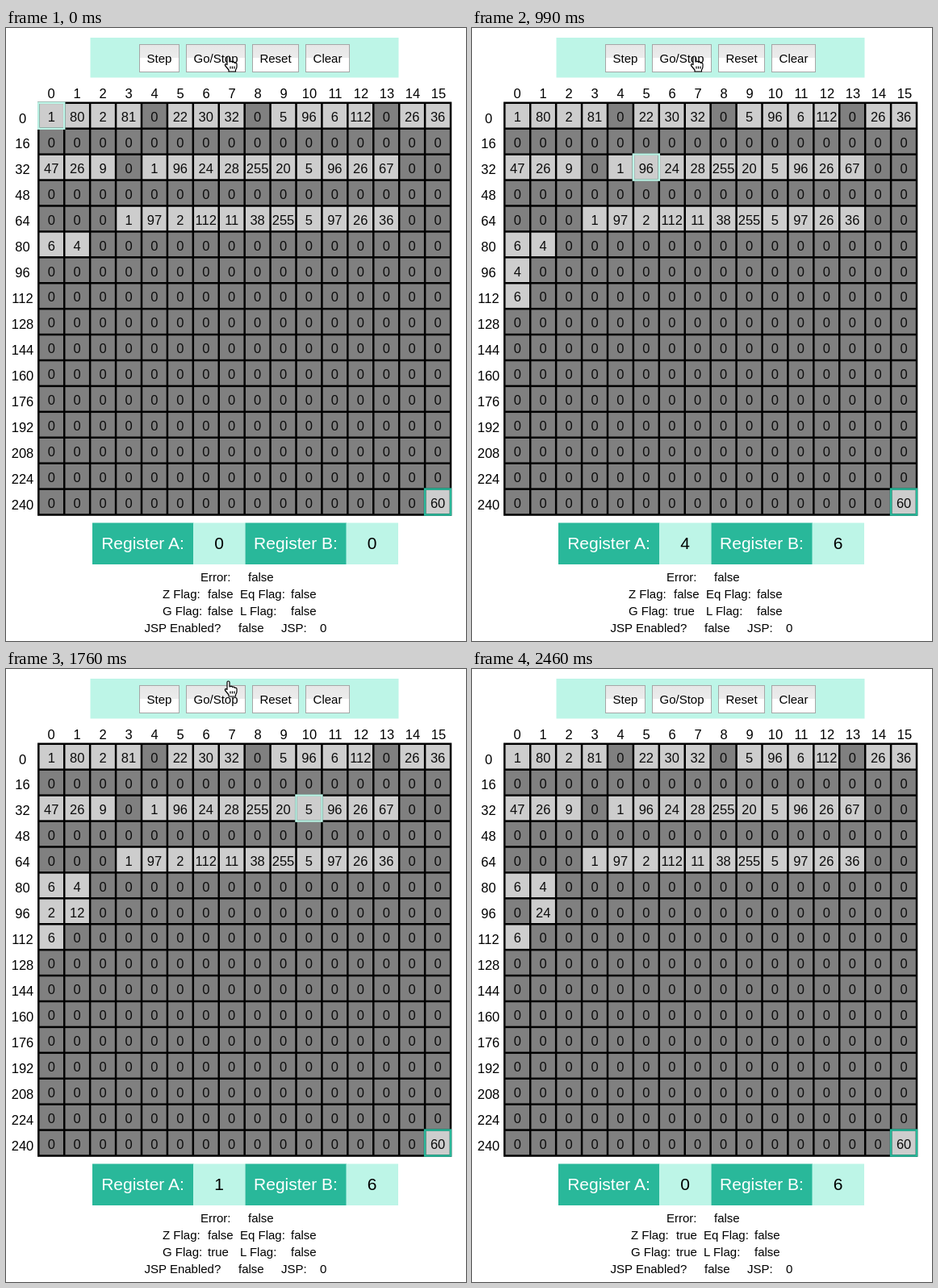
An HTML page that plays this animation: 570 by 760 pixels, repeating every 3.21 s.

```html
<!DOCTYPE html>
<html lang="en">
<head>
<meta charset="utf-8">
<title>Eight-bit computer</title>
<style>
html, body { margin: 0; width: 100%; height: 100%; overflow: hidden; background: #fff; }
svg { display: block; font-family: "Liberation Sans", Arial, sans-serif; }
text { white-space: pre; }
.num { font-size: 16.5px; text-anchor: middle; }
.btn { font-size: 15px; text-anchor: middle; }
.reg { font-size: 21px; text-anchor: middle; }
.flag { font-size: 15px; }
</style>
</head>
<body>
<svg id="stage" width="570" height="760" viewBox="0 0 570 760">
  <defs>
    <linearGradient id="up" x2="0" y2="1">
      <stop offset="0" stop-color="#e6e6e6"/><stop offset=".5" stop-color="#ececec"/>
      <stop offset=".5" stop-color="#fff"/><stop offset="1" stop-color="#fff"/>
    </linearGradient>
    <linearGradient id="down" x2="0" y2="1">
      <stop offset="0" stop-color="#a8a8a8"/><stop offset="1" stop-color="#bcbcbc"/>
    </linearGradient>
  </defs>
</svg>
<script>
const LOOP = 3210, START = 675, STEP = 16.2;
const MINT = '#bdf5e7', TEAL = '#29b89a';
const X0 = 40.3, Y0 = 92.8, PITCH = 31.92, LINE = 2.5;
// Moments at which the screen refreshes.
const TICKS = [0, 600, 690, 750, 840, 930, 990, 1050, 1110, 1170, 1230, 1290, 1340,
  1400, 1460, 1520, 1580, 1640, 1700, 1760, 1820, 1880, 1930, 1990, 2050, 2110, 2170,
  2260, 2330, 2400, 2460];

const program = Array(256).fill(0);
const load = (at, ...bytes) => bytes.forEach((v, i) => program[at + i] = v);
load(0, 1, 80, 2, 81, 0, 22, 30, 32, 0, 5, 96, 6, 112, 0, 26, 36);
load(32, 47, 26, 9, 0, 1, 96, 24, 28, 255, 20, 5, 96, 26, 67);
load(67, 1, 97, 2, 112, 11, 38, 255, 5, 97, 26, 36);
load(80, 6, 4);
load(255, 60);

const withOperand = {
  1: (s, n) => { s.a = s.mem[n]; },
  2: (s, n) => { s.b = s.mem[n]; },
  5: (s, n) => { s.mem[n] = s.a; },
  6: (s, n) => { s.mem[n] = s.b; },
  26: (s, n) => { s.pc = n; },
  28: (s, n) => { if (s.zero) s.pc = n; },
  30: (s, n) => { if (s.greater) s.pc = n; },
  38: (s, n) => { if (s.a > 255) s.pc = n; }
};
const simple = {
  11: s => { s.a += s.b; },
  20: s => { s.a--; },
  22: s => { s.greater = s.a > s.b; },
  24: s => { s.zero = s.a === 0; },
  47: s => { [s.a, s.b] = [s.b, s.a]; },
  60: s => { s.pc = -1; }
};

// One byte is read per step; an instruction acts once its last byte is read.
function run(steps) {
  const s = { mem: [...program], a: 0, b: 0, pc: 0, zero: false, greater: false };
  let op = null;
  while (steps-- > 0 && s.pc >= 0) {
    const byte = s.mem[s.pc++];
    if (op) { op(s, byte); op = null; }
    else if (withOperand[byte]) op = withOperand[byte];
    else if (simple[byte]) simple[byte](s);
  }
  return s;
}

const stage = document.getElementById('stage');
function add(tag, attrs, content) {
  const el = document.createElementNS(stage.namespaceURI, tag);
  for (const k in attrs) el.setAttribute(k, attrs[k]);
  if (content !== undefined) el.textContent = content;
  return stage.appendChild(el);
}
const rect = (x, y, width, height, fill, more) => add('rect', { x, y, width, height, fill, ...more });
const text = (cls, x, y, content, fill = '#000') => add('text', { class: cls, x, y, fill }, content);
const cellX = i => X0 + PITCH * (i % 16);
const cellY = i => Y0 + PITCH * (i >> 4);
const frame = (i, stroke) => rect(cellX(i), cellY(i), PITCH, PITCH, 'none', { stroke, 'stroke-width': LINE });

// Buttons
rect(104.5, 12, 382, 49.5, MINT);
const buttons = [['Step', 165, 50], ['Go/Stop', 223, 74], ['Reset', 305, 58], ['Clear', 371, 55]]
  .map(([label, x, w]) => {
    const box = rect(x + .5, 20.5, w - 1, 34, 'url(#up)', { stroke: '#a6a6a6' });
    text('btn', x + w / 2, 43, label);
    return box;
  });

// Memory
for (let i = 0; i < 16; i++) {
  text('num', 56 + 32 * i, 87, i);
  text('num', 20.5, 117.5 + 31.95 * i, i * 16);
}
const size = 16 * PITCH + LINE;
rect(X0 - LINE / 2, Y0 - LINE / 2, size, size, '#000');
const cells = program.map((v, i) => ({
  box: rect(cellX(i) + LINE / 2, cellY(i) + LINE / 2, PITCH - LINE, PITCH - LINE, '#808080'),
  label: text('num', cellX(i) + PITCH / 2, cellY(i) + 23.2, '', '#0c0c0c')
}));
frame(255, TEAL);
const pointer = frame(0, MINT);

// Registers
function register(name, x) {
  rect(x, 613.5, 125.5, 51.5, TEAL);
  rect(x + 125, 613.5, 64.5, 51.5, MINT);
  text('reg', x + 62.5, 646, `Register ${name}:`, '#fff');
  return text('reg', x + 157, 646, 0);
}
const regA = register('A', 107), regB = register('B', 296.5);

// Flags
const flag = (x, y, content) => text('flag', x, y, content);
flag(241, 686, 'Error:'); flag(300, 686, 'false');
const flagRow = (y, left, right) =>
  [[194, left], [250, 'false'], [290, right], [353, 'false']].map(([x, s]) => ({ x, el: flag(x, y, s) }));
const rowZ = flagRow(707, 'Z Flag:', 'Eq Flag:');
const rowG = flagRow(728, 'G Flag:', 'L Flag:');
flag(171.5, 749, 'JSP Enabled?'); flag(288, 749, 'false');
flag(341, 749, 'JSP:'); flag(389, 749, '0');

const hand = add('path', {
  d: 'M-2 1.5Q-2 0 -.5 0T1 1.5V7Q4 5.5 4.5 7.5Q7 6.5 7.5 8.5Q10 7.8 10 10V13Q10 15 8.5 17V19H0V17L-4.5 11.500Q-5 8.5 -2 10.5Z' +
     'M2 12.500V15.500M4.500 12.500V15.500M7 12.500V15.500',
  fill: '#fff', stroke: '#000', 'stroke-width': 1.2, 'stroke-linejoin': 'round'
});

function draw(t) {
  const s = run(Math.floor((t - START) / STEP));
  s.mem.forEach((v, i) => {
    cells[i].box.setAttribute('fill', v ? '#cdcdcd' : '#808080');
    cells[i].label.textContent = v;
  });
  pointer.setAttribute('visibility', s.pc < 0 ? 'hidden' : 'visible');
  pointer.setAttribute('x', cellX(s.pc));
  pointer.setAttribute('y', cellY(s.pc));
  regA.textContent = s.a;
  regB.textContent = s.b;
  rowZ[1].el.textContent = s.zero;
  rowG[1].el.textContent = s.greater;
  // The columns close up once both values are the shorter word.
  const shift = s.zero && s.greater ? 3 : 0;
  for (const row of [rowZ, rowG])
    row.forEach(({ x, el }, i) => el.setAttribute('x', x + (i < 2 ? shift : -shift)));
  buttons[1].setAttribute('fill', t >= 600 && t < 690 ? 'url(#down)' : 'url(#up)');
  const lift = Math.max(0, t - 1700) / 3;
  hand.setAttribute('transform', `translate(276 ${35 - lift})`);
}

let shown = -1;
function loop() {
  const now = performance.now() % LOOP;
  const tick = TICKS.filter(t => t <= now).pop();
  if (tick !== shown) draw(shown = tick);
  requestAnimationFrame(loop);
}
loop();
</script>
</body>
</html>
```
